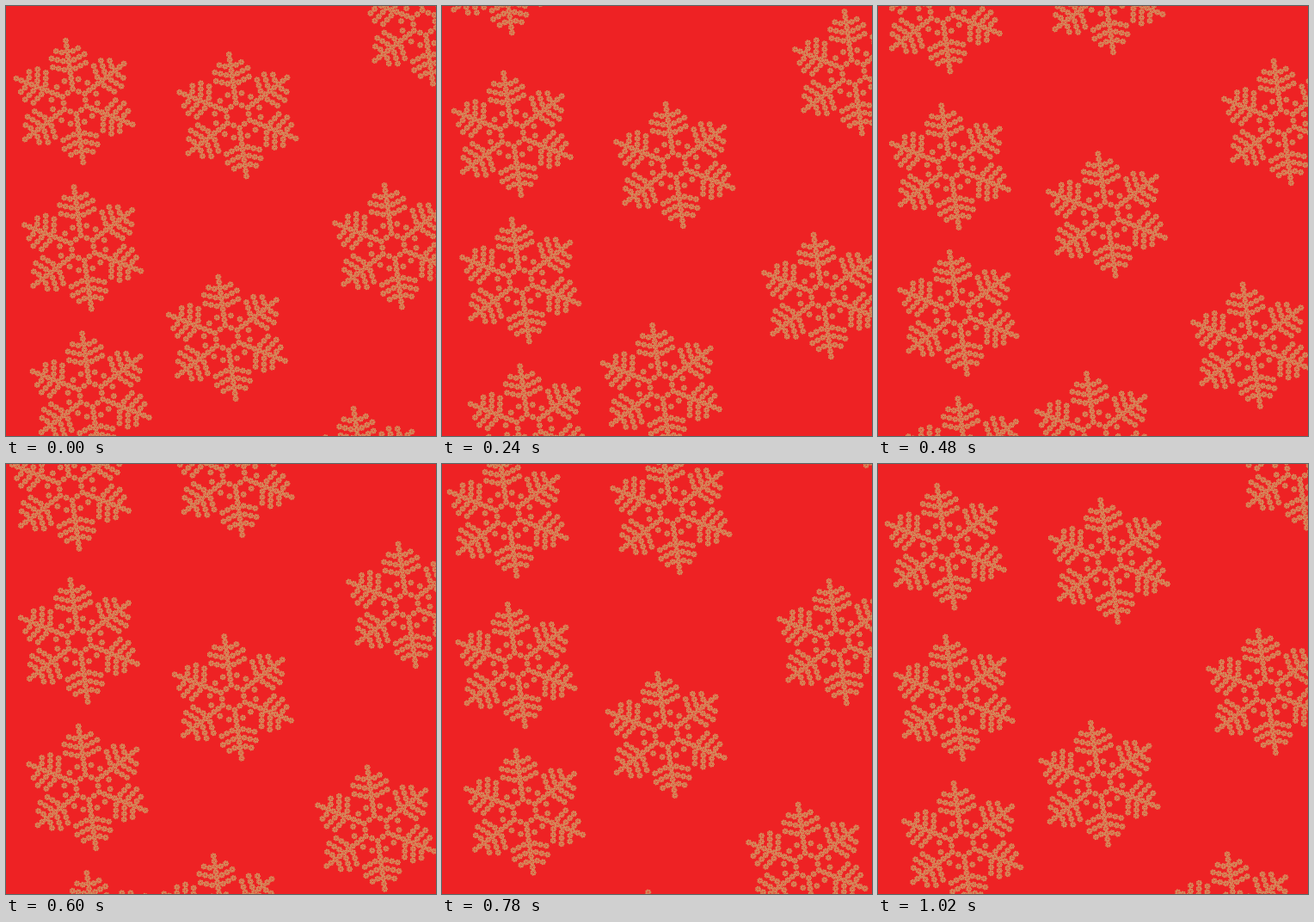
An HTML page with a canvas for the animation above (1080 ms loop, 500x500 px).

```html
<!DOCTYPE html>
<html>
<head>
<meta charset="utf-8">
<style>
html, body { margin: 0; width: 100%; height: 100%; overflow: hidden; background: #ee2224; }
canvas { display: block; }
</style>
</head>
<body>
<canvas id="stage" width="500" height="500"></canvas>
<script>
const LOOP = 1080, STEP = 60, TURN = Math.PI * 2;
const RED = '#ee2224', TAN = '#d29460';
const ctx = document.getElementById('stage').getContext('2d');

// Line through zero whose slope changes there
const bend = (d, before, after) => d * (d < 0 ? before : after);

// Top tip of a flake that has been falling for `age` ms, one rule per column
const lanes = [
  age => {
    const y = age < LOOP
      ? bend(age - 720, 0.187, 0.154) - 21
      : 40 + 0.1577 * (age - LOOP);
    return [67.1 + 0.056 * y, y];
  },
  age => {
    const y = 272.6 + bend(age - 1980, 0.2405, 0.2345);
    return [261 + bend(y - 100, 0.042, -0.0737) + bend(y - 272, 0, 0.035), y];
  },
  age => {
    const y = bend(age - LOOP, 0.267, 0.2405) - 51.5;
    return [468.8 - 0.1384 * y, y];
  }
];

const rim = new Path2D(), specks = new Path2D();

function dot(path, x, y, r) {
  path.moveTo(x + r, y);
  path.arc(x, y, r, 0, TURN);
}

// A bead is a small rosette: scalloped rim, specks and an eye
function bead(x, y) {
  dot(rim, x, y, 2.8);
  dot(specks, x, y, 0.8);
  for (let i = 0; i < 7; i++) {
    const c = Math.cos(i * TURN / 7), s = Math.sin(i * TURN / 7);
    dot(rim, x + 2.6 * c, y + 2.6 * s, 1);
    dot(specks, x + 2 * c, y + 2 * s, 0.45);
  }
}

function branch(angle) {
  const c = Math.cos(angle), s = Math.sin(angle);
  const put = (out, side) => bead(out * c - side * s, out * s + side * c);
  for (let i = 0; i < 10; i++) put(71.5 - 6.3 * i, 0);
  for (const side of [-1, 1]) {
    put(25, 8 * side);
    for (let row = 0; row < 3; row++)
      for (let i = 1; i <= (row ? 3 : 2); i++)
        put(56 - 10.2 * row + 2.4 * i, 6.3 * i * side);
  }
}

// Six branches, and between them the beads that close the inner ring
for (let i = 0; i < 6; i++) {
  const angle = (i * 60 - 98) * TURN / 360, mid = angle + TURN / 12;
  branch(angle);
  bead(12.5 * Math.cos(mid), 12.5 * Math.sin(mid));
}

function drawFlake(x, y) {
  ctx.save();
  ctx.translate(x + 10.3, y + 71);
  ctx.scale(1.02, 1);
  ctx.fillStyle = TAN;
  ctx.fill(rim);
  ctx.fillStyle = RED;
  ctx.fill(specks);
  ctx.restore();
}

function draw(now) {
  const t = Math.floor(now % LOOP / STEP) * STEP;
  ctx.fillStyle = RED;
  ctx.fillRect(0, 0, 500, 500);
  for (const lane of lanes)
    for (let k = 0; k < 4; k++) drawFlake(...lane(t + k * LOOP));
}

const begin = performance.now();
function tick() {
  draw(performance.now() - begin);
  requestAnimationFrame(tick);
}
tick();
</script>
</body>
</html>
```
